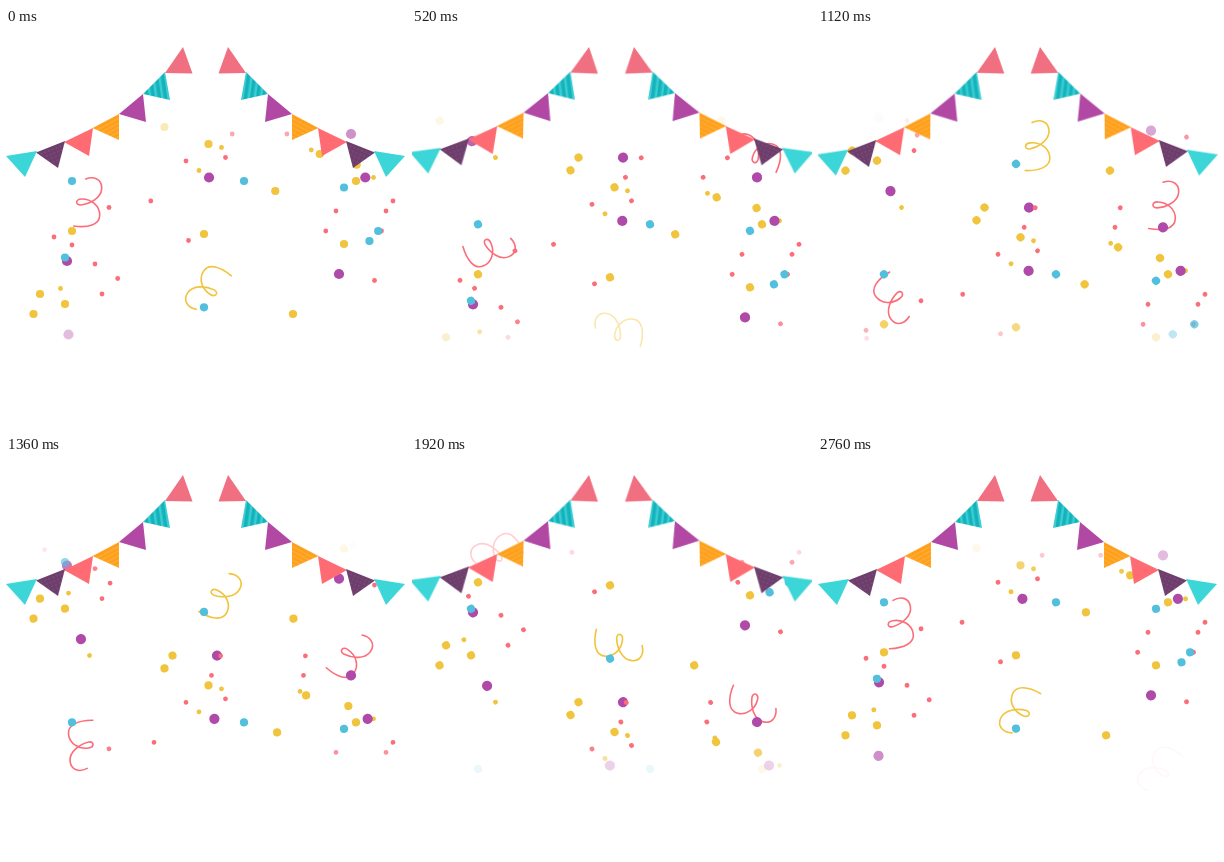
Write an HTML page without scripts that moves like this. It is 400 px wide and 400 px high and loops after 2800 ms.

```html
<!DOCTYPE html>
<html lang="en">
<head>
<meta charset="utf-8">
<title>Party confetti</title>
<style>
@property --f { syntax: '<number>'; inherits: true; initial-value: 0; }
html, body { margin: 0; width: 100%; height: 100%; overflow: hidden; background: #fff; }
svg { display: block; width: 100vw; height: 100vh; animation: tick 2.8s steps(70) infinite; }
@keyframes tick { from { --f: 0; } to { --f: 70; } }

/* Every piece falls at one speed, wraps once and drifts along a parabola:
   --x, --y start; --a drift width; --c height of the turning point; --r start angle. */
.fall > * {
  --a: 0; --c: 220; --r: 0;
  --q: calc(var(--y) + var(--f) * 3.3333);
  --wrap: clamp(0, (var(--q) - 321) * 1000, 1);
  --p: calc(var(--q) - var(--wrap) * 236.7);
  --d: calc((var(--q) - var(--wrap) * 224 - var(--c)) / 97);
  transform: translate(calc((var(--x) + var(--a) * var(--d) * var(--d)) * 1px), calc(var(--p) * 1px))
             rotate(calc((var(--r) + var(--f) * 5.07) * 1deg));
  opacity: clamp(0, min((var(--p) - 89) / 28, (316 - var(--p)) / 26), 1);
}
.ribbons { fill: none; stroke-width: 1.6; stroke-linecap: round; }
.pink { fill: #fc6d7a; }
.yellow { fill: #f0c43c; }
.blue { fill: #52bfdc; }
.purple { fill: #b04aa8; }
.pink circle { r: 2.4px; }
.yellow circle, .blue circle { r: 4.1px; }
.yellow .small { r: 2.4px; }
.purple circle { r: 5.1px; }

.sway { transform-origin: 177px 19px; animation: sway .7s cubic-bezier(.37, 0, .63, 1) infinite alternate; }
@keyframes sway { to { transform: rotate(1.45deg); } }
</style>
</head>
<body>
<svg viewBox="0 0 400 400">
  <defs>
    <pattern id="teal" width="6" height="6" patternUnits="userSpaceOnUse" patternTransform="rotate(-8)">
      <path fill="#14b3bc" d="M0 0h6v6h-6z"/><path fill="#3ccdd2" d="M0 0h2.4v6h-2.4z"/>
    </pattern>
    <pattern id="orange" width="4" height="4" patternUnits="userSpaceOnUse" patternTransform="rotate(-28)">
      <path fill="#ff9f17" d="M0 0h4v4h-4z"/><path fill="#fdac38" d="M0 0h4v1.5h-4z"/>
    </pattern>
    <pattern id="plum" width="4" height="4" patternUnits="userSpaceOnUse" patternTransform="rotate(-22)">
      <path fill="#6d3d6c" d="M0 0h4v4h-4z"/><circle cx="2" cy="2" r=".8" fill="#82577f"/>
    </pattern>
    <g id="garland">
      <path fill="#f06f80" d="M177 19L159 45L186.500 45.500z"/>
      <path fill="url(#teal)" d="M159 44L137 66L164 72z"/>
      <path fill="#b048a4" d="M137 66L113 86L140 94z"/>
      <path fill="url(#orange)" d="M113 86L86.500 100L113 112z"/>
      <path fill="#ff6b73" d="M87 100L58 114L83 128z"/>
      <path fill="url(#plum)" d="M59 113L30 124.500L52 140z"/>
      <path fill="#3dd6d8" d="M31 123L0 128L19 149z"/>
    </g>
    <path id="curl" d="M2-24C10-27 18-24 18-15C18-5 6 1-3 2C-9 2-8-4-2-4C8-4 16 3 16 12C16 22 4 25-10 23"/>
  </defs>

  <g class="fall ribbons">
    <use href="#curl" stroke="#fc6d7a" style="--x:76;--y:175;--a:8"/>
    <use href="#curl" stroke="#f0c43c" style="--x:204.500;--y:262;--a:7;--c:248;--r:212"/>
    <use href="#curl" stroke="#fc6d7a" style="--x:341;--y:84.700;--a:4;--c:225;--r:221"/>
  </g>

  <g class="fall pink">
    <circle style="--x:219.500;--y:129.500"/>
    <circle style="--x:180;--y:133"/>
    <circle style="--x:182.500;--y:212.500"/>
    <circle style="--x:103;--y:179.500"/>
    <circle style="--x:48;--y:209"/>
    <circle style="--x:89;--y:236"/>
    <circle style="--x:96;--y:266"/>
    <circle style="--x:330;--y:183"/>
    <circle style="--x:380;--y:183"/>
    <circle style="--x:375.500;--y:203"/>
    <circle style="--x:387;--y:173"/>
    <circle style="--x:368.500;--y:252.500"/>
    <circle style="--x:205.500;--y:106;--a:15"/>
    <circle style="--x:141.500;--y:173;--a:14"/>
    <circle style="--x:66;--y:217;--a:-20"/>
    <circle style="--x:113;--y:250.500;--a:-13"/>
    <circle style="--x:297.500;--y:106;--a:-12"/>
    <circle style="--x:298;--y:86.500;--a:17;--c:228"/>
    <circle style="--x:319.500;--y:203;--a:9"/>
  </g>
  <g class="fall yellow">
    <circle style="--x:158.500;--y:99"/>
    <circle style="--x:166.500;--y:86.200"/>
    <circle style="--x:202.500;--y:116"/>
    <circle style="--x:198;--y:206"/>
    <circle style="--x:66;--y:203"/>
    <circle style="--x:34;--y:266"/>
    <circle style="--x:59;--y:276"/>
    <circle style="--x:27.500;--y:286"/>
    <circle style="--x:338;--y:216"/>
    <circle style="--x:350;--y:153"/>
    <circle style="--x:263;--y:163;--a:21;--c:216"/>
    <circle style="--x:282;--y:286;--a:16;--c:232"/>
    <circle style="--x:342;--y:136.700;--a:9;--c:232"/>
    <circle style="--x:300;--y:126;--a:12;--c:230"/>
    <circle class="small" style="--x:83.500;--y:86.200"/>
    <circle class="small" style="--x:215.500;--y:119.500"/>
    <circle class="small" style="--x:193;--y:142.500"/>
    <circle class="small" style="--x:367.500;--y:149.500"/>
    <circle class="small" style="--x:50.500;--y:260.500;--a:23"/>
    <circle class="small" style="--x:292.500;--y:122;--a:17;--c:206"/>
  </g>
  <g class="fall purple">
    <circle style="--x:61;--y:233"/>
    <circle style="--x:333;--y:246"/>
    <circle style="--x:345;--y:106"/>
    <circle style="--x:211;--y:86.200"/>
    <circle style="--x:211.500;--y:149.500;--a:-16"/>
    <circle style="--x:76;--y:306.500;--a:-17"/>
    <circle style="--x:363;--y:149.500;--a:-7"/>
  </g>
  <g class="fall blue">
    <circle style="--x:66;--y:153"/>
    <circle style="--x:238;--y:153"/>
    <circle style="--x:338;--y:159.500"/>
    <circle style="--x:59;--y:229.500"/>
    <circle style="--x:198;--y:279.300"/>
    <circle style="--x:372;--y:203;--a:7"/>
    <circle style="--x:363.500;--y:213;--a:-11"/>
  </g>
  <g class="fall pink">
    <circle style="--x:213.500;--y:86.500;--a:16;--c:226"/>
  </g>

  <g class="sway"><use href="#garland"/></g>
  <g transform="translate(399) scale(-1 1)"><g class="sway"><use href="#garland"/></g></g>
</svg>
</body>
</html>
```
